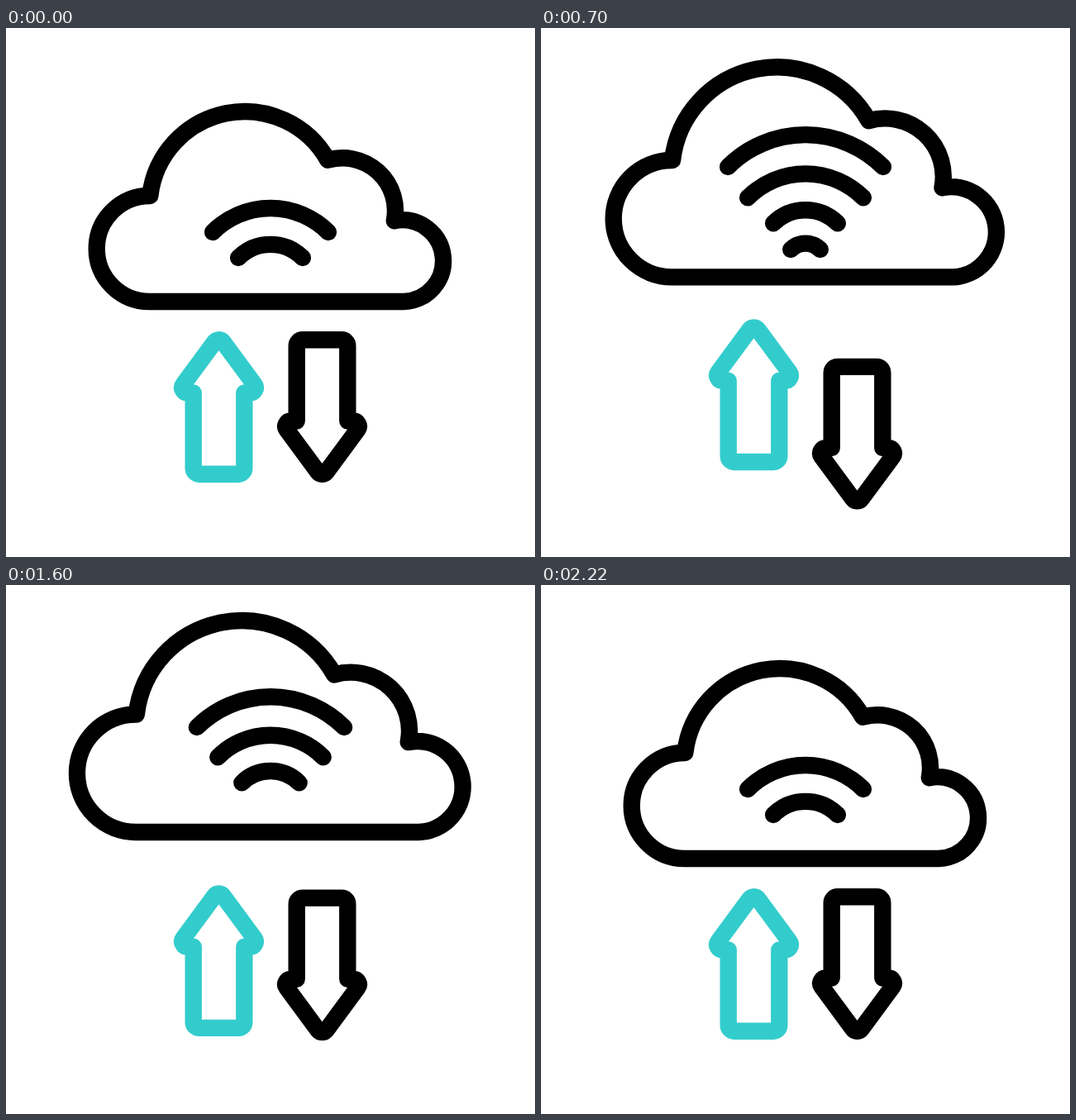
An HTML page that plays this animation: 640 by 640 pixels, repeating every 2.4 s.

```html
<!DOCTYPE html>
<html lang="en">
<head>
<meta charset="utf-8">
<title>Cloud transfer</title>
<style>
  html, body { margin: 0; width: 100%; height: 100%; overflow: hidden; background: #fff; }
  svg { display: block; width: 100vw; height: 100vh; }
  path { fill: none; stroke: #000; stroke-width: 20.4; stroke-linecap: round; stroke-linejoin: round; }
  #up { stroke: #33cccc; }
</style>
</head>
<body>
<svg viewBox="0 0 640 640">
  <path id="cloud" d="M173.7 331A64 64 0 0 1 173.7 203H174.3A115.3 115.3 0 0 1 389.3 159.8A63.8 63.8 0 0 1 469.8 233.2A49.4 49.4 0 1 1 481 331Z"/>
  <path id="waves"/>
  <path id="up"/>
  <path id="down"/>
</svg>
<script>
const LOOP = 2400, STEP = 20, START = 200, END = 2200, WAVE = 500;
const LIFT = 45, GROWTH = 0.113, STROKE = 20.4;
const [cloud, waves, up, down] = ['cloud', 'waves', 'up', 'down'].map(id => document.getElementById(id));

// Half width and end height of a signal arc at each stage of its way out.
const STAGES = [[17.8, 309.7], [38.9, 278], [69.9, 247], [93.9, 209.7]];
const CLOUD_KEYS = [[START, 0], [800, 1], [1800, 1], [END, 0]];
const UP_KEYS = bounce(36.3, [START, 520, 840, 1210, 1530, 1880, END]);
const DOWN_KEYS = bounce(38, [START, 620, 958, 1300, 1638, 1978, END]);

function bounce(height, times) {
  return times.map((time, i) => [time, i % 2 ? height : 0]);
}

function ease(keys, t) {
  if (t <= keys[0][0]) return keys[0][1];
  for (let i = 1; i < keys.length; i++) {
    const [t0, a] = keys[i - 1], [t1, b] = keys[i];
    if (t <= t1) {
      const x = (t - t0) / (t1 - t0);
      return a + (b - a) * x * x * (3 - 2 * x);
    }
  }
  return keys[keys.length - 1][1];
}

// Closed polygon of [x, y, corner radius].
function roundedPolygon(points) {
  const n = points.length;
  const parts = points.map(([x, y, r], i) => {
    if (!r) return `L${x} ${y}`;
    const toward = ([px, py]) => {
      const len = Math.hypot(px - x, py - y);
      return [(px - x) / len, (py - y) / len];
    };
    const [ax, ay] = toward(points[(i + n - 1) % n]);
    const [bx, by] = toward(points[(i + 1) % n]);
    const cut = r / Math.tan(Math.acos(ax * bx + ay * by) / 2);
    const sweep = ax * by - ay * bx < 0 ? 1 : 0;
    return `L${x + ax * cut} ${y + ay * cut}A${r} ${r} 0 0 ${sweep} ${x + bx * cut} ${y + by * cut}`;
  });
  return 'M' + parts.join('').slice(1) + 'Z';
}

function arrowPath() {
  const right = [[50.6, 441.5, 6.4], [30.8, 441.5, 0], [30.8, 539.7, 7]];
  const left = right.map(([x, y, r]) => [-x, y, r]).reverse();
  return roundedPolygon([[0, 372.9, 6.4], ...right, ...left]);
}

function arcPath(stage, lift) {
  const i = Math.min(Math.floor(stage), STAGES.length - 2), f = stage - i;
  const [w, y] = STAGES[i].map((v, k) => v + (STAGES[i + 1][k] - v) * f);
  const r = w * Math.SQRT2;
  return `M${320 - w} ${y - lift}A${r} ${r} 0 0 1 ${320 + w} ${y - lift}`;
}

function waveStages(t) {
  if (t < START || t > END) return [1, 2];
  if (t === END) return [1, 2, 3];
  const phase = ((t - START) % WAVE) / WAVE;
  const stages = [phase, 1 + phase, 2 + phase];
  if (phase === 0 && t > START) stages.push(3);
  return stages;
}

function draw(time) {
  const t = Math.floor((time % LOOP) / STEP) * STEP;
  const rise = ease(CLOUD_KEYS, t), lift = LIFT * rise, scale = 1 + GROWTH * rise;
  cloud.setAttribute('transform', `translate(320 ${216 - lift}) scale(${scale}) translate(-320 -216)`);
  cloud.style.strokeWidth = STROKE / scale;
  waves.setAttribute('d', waveStages(t).map(s => arcPath(s, lift)).join(''));
  up.setAttribute('transform', `translate(257.5 ${-ease(UP_KEYS, t)})`);
  down.setAttribute('transform', `translate(382.5 ${917 + ease(DOWN_KEYS, t)}) rotate(180)`);
}

up.setAttribute('d', arrowPath());
down.setAttribute('d', arrowPath());
draw(0);

let origin;
requestAnimationFrame(function tick(now) {
  origin ??= now;
  draw(now - origin);
  requestAnimationFrame(tick);
});
</script>
</body>
</html>
```
